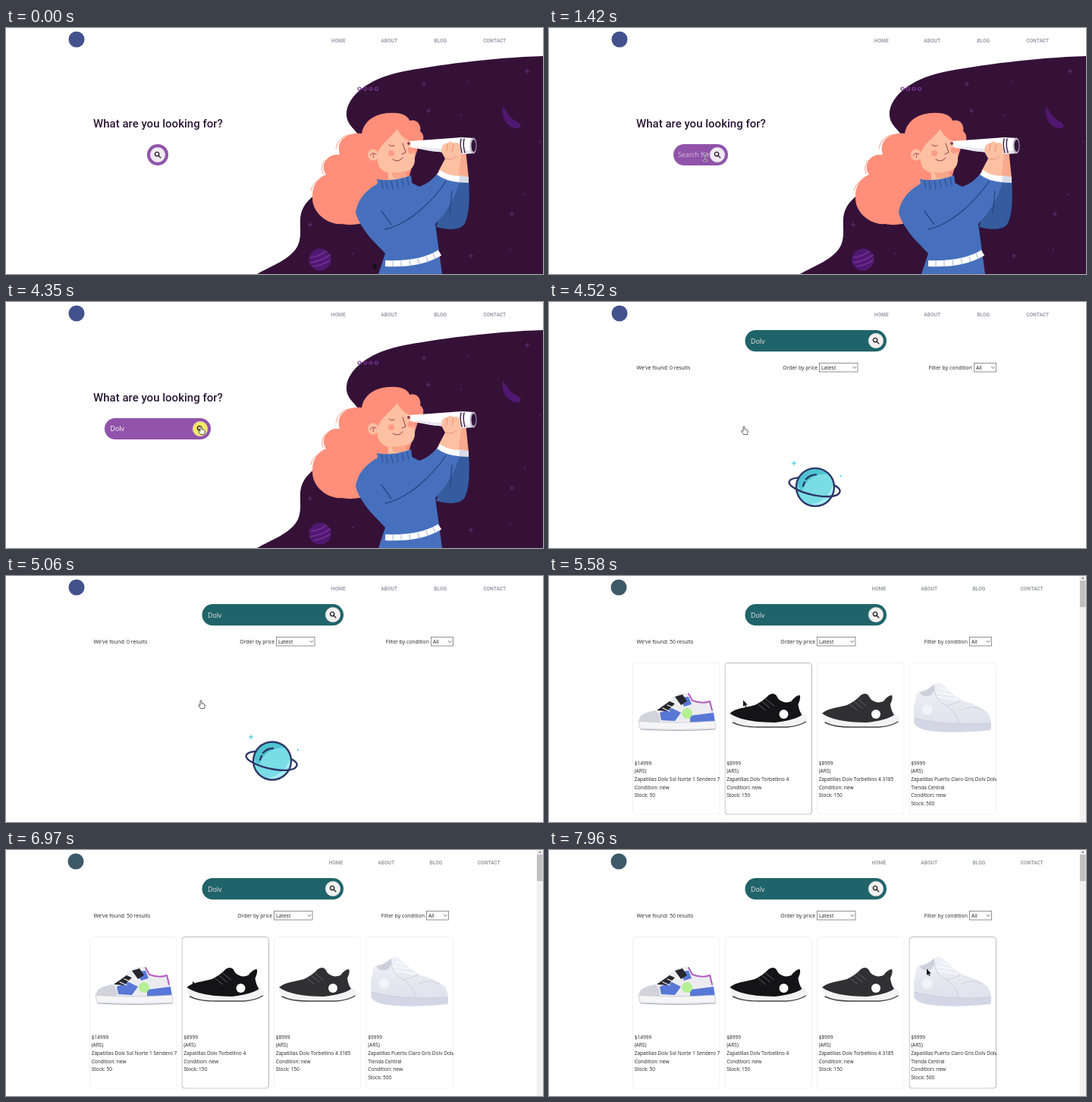
These frames come from a looping animation (708 px wide and 324 px high, 8 s). An HTML page:

```html
<!DOCTYPE html>
<html lang="en">
<head>
<meta charset="utf-8">
<style>
  html, body { margin: 0; width: 100%; height: 100%; overflow: hidden; background: #fff; }
  svg { display: block; font-family: "Open Sans", "Noto Sans", sans-serif; }
  .roboto { font-family: Roboto, sans-serif; }
  .line { fill: none; stroke-linecap: round; stroke-linejoin: round; }
</style>
</head>
<body>
<svg id="stage" width="708" height="324" viewBox="0 0 708 324">
  <defs>
    <g id="lens">
      <circle r="9.8" stroke="#d8d4da" stroke-width=".6"/>
      <g class="line" stroke="#2b2033" stroke-width="1.4"><circle cx="-.9" cy="-.9" r="2.7"/><path d="M1.2 1.2L3.8 3.8"/></g>
    </g>
    <path id="plus" class="line" d="M-2.8 0H2.8M0-2.8V2.8" stroke="#633079"/>
    <linearGradient id="leather" x2="0" y2="1"><stop stop-color="#f0f1f6"/><stop offset="1" stop-color="#dcdfea"/></linearGradient>
    <g id="runner">
      <path fill="#f3f3f4" d="M7 67Q30 78 60 78Q90 76 102 67Q110 70 109 76Q100 84 70 84Q30 86 14 80Q6 76 7 67Z"/>
      <path class="line" stroke="#444" stroke-width="1.5" d="M11 79Q22 85 45 85H82Q98 84 107 78"/>
      <path d="M7 67C14 60 30 59 40 56Q52 50 58 43Q64 39 68 43L71 48Q79 55 88 51Q94 43 99 43Q101 46 97 55Q98 63 102 69Q92 76 66 79Q24 79 7 67Z"/>
      <path class="line" d="M44 55L54 63M49 51L60 60M54 48L65 57" stroke="#707074" stroke-width=".8"/>
      <circle cx="78" cy="68" r="6" fill="#fff"/>
    </g>
  </defs>

  <g id="home">
    <path fill="#351138" d="M708 37C640 39 566 49 520 58C472 68 447 94 449 116C451 134 474 138 470 165C462 200 422 205 402 224C378 246 394 264 385 286C376 305 348 314 331 324H708Z"/>
    <g id="stars"></g>
    <path fill="#501871" d="M655 103C652 121 664 134 677 132Q681 126 673 123C664 119 661 111 655 103Z"/>
    <circle cx="414" cy="305" r="14.5" fill="#501871"/>
    <path class="line" stroke="#71318f" stroke-width="1.6" d="M402 302Q413 301 422 294M401 309Q416 307 427 299M406 314Q418 312 427 306"/>

    <path fill="#345c9f" d="M588 194L610 200Q613 244 604 259Q594 269 567 262Z"/>
    <path fill="#f8aa8e" d="M594 160H606L610 198H588Z"/>
    <path fill="#d9dbe7" d="M590 193L610 196V204L590 203Z"/>
    <path fill="#ff8f7a" d="M469 139C472 121 489 112 506 112C522 111 530 116 532 122C542 119 548 128 546 136C553 141 551 151 544 155L530 200L500 235C488 256 460 262 443 258C425 260 404 244 404 224C403 207 412 197 422 193C413 181 424 164 440 167C434 148 450 137 469 139Z"/>
    <path class="line" stroke="#ff9e89" d="M435 159Q437 143 455 140M418 192Q414 182 421 174M402 214Q405 202 417 198"/>
    <path fill="#4670bd" d="M490 205Q465 219 461 242Q463 255 480 276L500 297L491 324H575L566 258Q588 236 598 204L570 190Q560 204 545 209L535 204Z"/>
    <path fill="#fdc0a2" d="M490 176C486 156 506 147 516 133Q523 148 538 150L539 175Q537 190 519 190L523 201Q510 206 504 200V191Q491 187 490 176Z"/>
    <path fill="#f8a58a" d="M508 190Q516 192 526 188L530 198H511Z"/>
    <path fill="#4670bd" d="M489 199Q510 203 534 194L536 210Q512 216 491 211Z"/>
    <path class="line" stroke="#2b4885" d="M495 201L497 211M501 202L503 212M508 202L510 212M515 201L517 211M522 199L524 209M529 197L531 207"/>
    <ellipse cx="484" cy="167" rx="7" ry="7.5" fill="#fdc0a2"/>
    <path class="line" stroke="#a8485a" d="M480 168Q482 163 488 166M485 166L484 171"/>
    <g fill="#ff9a86"><circle cx="508" cy="165" r="4"/><circle cx="534" cy="161" r="4.5"/></g>
    <path class="line" stroke="#963b4d" d="M505 154Q508 157 512 155M523 152L527 164L522 166M510 173Q517 178 523 171"/>
    <path fill="#fff" d="M532 149L560 147L601 144L616 145V165L600 166L560 162L533 157Z"/>
    <path fill="#e7e7ef" d="M533 155L560 158L600 162L616 161V165L600 166L560 162Z"/>
    <path class="line" stroke="#452252" stroke-width="1.5" d="M600 146Q598 154 601 164M604 146Q602 154 605 164"/>
    <ellipse cx="616" cy="155" rx="4.5" ry="10.5" fill="#b8b4c4"/><ellipse cx="616.6" cy="155" rx="3" ry="8" fill="#31143a"/>
    <circle cx="531" cy="152" r="2" fill="#8b3d50"/>
    <path fill="#fdc0a2" d="M574 163Q574 151 582 152Q586 147 590 152Q596 149 598 155L600 168L596 198L570 189L579 172Z"/>
    <path class="line" stroke="#ec9279" d="M582 152L581 162M590 152L588 163M579 172Q588 175 594 169"/>
    <path fill="#fff" d="M572 187Q583 195 598 195L597 203Q580 202 568 193Z"/>
    <path class="line" stroke="#284581" stroke-width="1.3" d="M500 265C530 259 562 229 580 202M495 241L508 259M588 215L585 244"/>
    <path class="line" stroke="#fff" stroke-width="8" style="stroke-linecap:butt" d="M500 310Q546 312 572 296"/>
    <path class="line" stroke="#9fb1d8" d="M510 307V314M521 307V314M532 306L533 313M543 304L545 311M554 301L556 308M563 297L566 304"/>

    <text class="roboto" x="115" y="131" font-size="15" font-weight="500" fill="#2b1836">What are you looking for?</text>
    <rect id="bar" y="153" height="28" rx="14" fill="#9153aa"/>
    <svg id="field" y="153" height="28">
      <text id="hint" y="17.2" font-size="8.8" fill="#d6bce0">Search for...</text>
      <text id="typed" y="17.2" font-size="8.8" fill="#fff"></text>
      <rect id="caret" y="8.5" width=".8" height="11" fill="#fff"/>
    </svg>
    <use id="button" href="#lens"/>
  </g>

  <g id="results">
    <rect x="258.5" y="37" width="186.5" height="28.3" rx="14.1" fill="#1f646a"/>
    <text x="266" y="55" font-size="8.8" fill="#f0e4df">Dolv</text>
    <use href="#lens" x="431" y="51" fill="#f1f1ee"/>
    <text id="count" x="115.5" y="88.5" font-size="6.9" fill="#222"></text>
    <g id="order"></g>
    <g id="filter"></g>
  </g>

  <g id="loader">
    <circle cx="351" cy="243.5" r="25" fill="#7adde6"/>
    <path fill="#4fc4d2" d="M327 240A25 25 0 0 1 369 226Q342 225 333 250Z"/>
    <path fill="#a6edf2" d="M375 237A25 25 0 0 1 343 267Q370 262 375 237Z"/>
    <g class="line" stroke="#2d3767" stroke-width="2.4">
      <circle cx="351" cy="243.5" r="25"/>
      <path d="M329 231C314 232 313 239 324 245C341 255 371 259 381 253Q388 247 376 241M335 242Q336 239 337 237M339 233Q344 227 352 227"/>
    </g>
    <g id="sparkles" fill="#62d3dd"><path d="M323 208L324 211L327 212L324 213L323 216L322 213L319 212L322 211Z"/><circle cx="385" cy="229" r="1.2"/></g>
  </g>

  <g id="cards"></g>
  <g id="scroll"><rect x="699.5" width="8.5" height="324" fill="#f1f1f1"/><rect x="700" y="6" width="7.5" height="35" fill="#c1c1c1"/><path d="M702 3.5L703.8 1.5L705.6 3.5Z" fill="#555"/></g>

  <circle id="logo" cy="15" r="10.5"/>
  <g id="nav" class="roboto" font-size="6.65" font-weight="700"></g>

  <g id="pointer">
    <path id="arrow" d="M0 0V8.4L1.9 6.7L3.2 9.6L4.5 9L3.2 6.2H5.8Z" fill="#111"/>
    <g id="beam" class="line"><path d="M-2-4.5H2M0-4.5V4.5M-2 4.5H2" stroke="#e6d8ec" stroke-width="2"/><path d="M-1.8-4.5H1.8M0-4.5V4.5M-1.8 4.5H1.8" stroke="#4a3553" stroke-width=".9"/></g>
    <path id="hand" d="M0 1Q1-.6 2 1V4.2L5 5Q6.6 5.4 6.3 7.5L5.4 11H.6L-2.4 6.8Q-2 5.4 0 6.8Z" fill="#fff" stroke="#333" stroke-width=".8"/>
  </g>
</svg>

<script>
const LOOP = 8000, SUBMIT = 4520, LOADED = 5360;
const $ = id => document.getElementById(id);
const set = (node, attrs) => { for (const k in attrs) node.setAttribute(k, attrs[k]); };
const show = (id, on) => { $(id).style.display = on ? "" : "none"; };

$("stars").innerHTML =
  [[551, 74], [687, 57], [557, 109], [667, 245], [401, 259], [613, 300]]
    .map(([x, y]) => `<use href="#plus" x="${x}" y="${y}"/>`).join("") +
  [[600, 115], [704, 150], [684, 219], [665, 292], [457, 297], [610, 71]]
    .map(([x, y]) => `<circle cx="${x}" cy="${y}" r="1" fill="#5d2875"/>`).join("") +
  [466, 473.5, 481, 488.5]
    .map(x => `<circle cx="${x}" cy="80" r="2" fill="none" stroke="#7b3698" stroke-width="1.2"/>`).join("");

$("nav").innerHTML = ["HOME", "ABOUT", "BLOG", "CONTACT"].map(s => `<text y="19">${s}</text>`).join("");
const navX = { wide: [428.8, 494.3, 564.3, 629.2], narrow: [425.5, 490.3, 558.5, 621.7] };

const dropdown = (label, labelX, value, x, w) => `<g font-size="6.85" fill="#222">
  <text x="${labelX}" y="88.7">${label}</text>
  <rect x="${x}" y="80.5" width="${w}" height="11.5" fill="#fff" stroke="#777" stroke-width=".8"/>
  <text x="${x + 2.5}" y="88.7">${value}</text>
  <path class="line" stroke="#444" stroke-width=".8" d="M${x + w - 6} 85.5l1.9 1.9l1.9-1.9"/></g>`;
$("order").innerHTML = dropdown("Order by price", 308.3, "Latest", 356.5, 50.5);
$("filter").innerHTML = dropdown("Filter by condition", 500.8, "All", 560.5, 29);

// Shoe pictures use coordinates relative to their card
const shoes = [
  `<path fill="#ececf0" d="M8 78Q9 68 22 65L38 62L50 48Q61 38 73 40L78 49Q92 55 103 50L106 60L109 80H8Z"/>
   <path fill="#d3d4db" d="M8 78Q9 68 22 65L30 63Q38 69 36 78Z"/>
   <path fill="#5877d6" d="M36 66L52 60L64 66L56 77L38 76ZM76 70L107 66L109 79H76ZM62 46L74 45L78 55L68 58Z"/>
   <path fill="#26262e" d="M32 63L49 51L56 54L46 64ZM56 45L66 42L72 51L64 56Z"/>
   <path class="line" stroke="#fff" stroke-width="1.2" d="M40 60L49 64M46 56L56 60M51 51L62 56"/>
   <path class="line" stroke="#b45fc0" stroke-width="2" d="M74 41L79 50Q92 55 102 51L105 63"/>
   <circle cx="72" cy="67" r="7" fill="#b5f095"/>
   <path fill="#f5f5f8" stroke="#c3c4cc" stroke-width=".7" d="M8 77Q50 81 109 77L110 87Q60 90 10 87Z"/>
   <path class="line" stroke="#a9abb5" stroke-width="1" d="M11 88Q60 91 109 88"/>`,
  `<use href="#runner" fill="#141416"/>`,
  `<use href="#runner" fill="#302f32"/>`,
  `<path fill="url(#leather)" d="M7 70Q5 58 9 50Q8 41 14 38Q25 36 32 29Q39 24 45 29L57 41L70 50Q93 56 104 66Q110 76 108 88Q60 92 30 90Q12 88 7 80Z"/>
   <path fill="#cdd0dc" d="M14 39Q25 37 33 29Q36 36 29 43Q18 47 14 39Z"/>
   <path fill="#d3d7e5" d="M7 73Q45 84 108 80V89Q60 94 30 90Q12 88 7 80Z"/>
   <path class="line" stroke="#f8f8fb" stroke-width="2" d="M40 33L51 38M37 39L57 43M38 45L64 49"/>
   <path class="line" stroke="#c5c8d5" stroke-width=".8" d="M33 34Q34 50 50 57L68 51M50 57Q62 66 66 80M70 62Q84 55 98 63M7 73Q45 84 108 80"/>
   <circle cx="24" cy="62" r="7" fill="#f2f3f8"/>`
];
const items = [
  ["$14999", "(ARS)", "Zapatillas Dolv Sol Norte 1 Sendero 75", "Condition: new", "Stock: 50"],
  ["$8999", "(ARS)", "Zapatillas Dolv Torbellino 4", "Condition: new", "Stock: 150"],
  ["$8999", "(ARS)", "Zapatillas Dolv Torbellino 4 3185", "Condition: new", "Stock: 150"],
  ["$9999", "(ARS)", "Zapatillas Puerto Claro Gris Dolv Dolv", "Tienda Central", "Condition: new", "Stock: 500"]
];
const cardX = i => 110 + i * 121.5;
$("cards").innerHTML = items.map((lines, i) => `<svg x="${cardX(i)}" y="114" width="115.5" height="200.5">
  <rect class="card" x=".5" y=".5" width="114.5" height="199.5" rx="4" fill="#fff" stroke-width=".9"/>
  ${shoes[i]}
  ${lines.map((s, j) => `<text x="2.7" y="${134.7 + j * 10.6}" font-size="6.55" fill="#222">${s}</text>`).join("")}</svg>`).join("");
const cards = document.querySelectorAll(".card");

// Pointer stops: time, x, y
const path = [
  [0, 484, 309], [70, 484, 309], [830, 307, 248], [1320, 207, 173], [1420, 206, 170], [1650, 217, 168], [1950, 224, 167],
  [3890, 224, 167], [4270, 256, 163.5], [6270, 256, 163.5], [6650, 172, 176], [7040, 262, 172],
  [7120, 278, 170], [7890, 488, 157.5], [7960, 498, 156.5], [LOOP, 498, 156.5]
];
function pointerAt(t) {
  const i = path.findIndex(p => p[0] > t), [t0, x0, y0] = path[i - 1], [t1, x1, y1] = path[i];
  const k = (t - t0) / (t1 - t0);
  return [x0 + (x1 - x0) * k, y0 + (y1 - y0) * k];
}

// cubic-bezier(.25, .1, .25, 1)
function ease(p) {
  if (p <= 0 || p >= 1) return p <= 0 ? 0 : 1;
  const curve = (s, a, b) => 3 * (1 - s) ** 2 * s * a + 3 * (1 - s) * s * s * b + s ** 3;
  let lo = 0, hi = 1;
  for (let i = 0; i < 20; i++) {
    const mid = (lo + hi) / 2;
    if (curve(mid, .25, .25) < p) lo = mid; else hi = mid;
  }
  return curve(lo, .1, 1);
}

function drawSearch(t, overButton) {
  const open = ease((t - 1324) / 400), width = 28 + 112 * open, left = 200 - width / 2;
  const inset = 5 + 2.5 * open;
  set($("bar"), { x: left, width });
  set($("field"), { x: left + inset, width: Math.max(0, width - 24 - inset) });
  set($("button"), { x: left + width - 14, y: 167, fill: overButton ? "#f6e866" : "#f0ebf3" });
  const length = t < 2810 ? 0 : Math.min(4, 1 + Math.floor((t - 2810) / 150));
  $("typed").textContent = "Dolv".slice(0, length);
  show("hint", !length && open > 0);
  show("caret", (t >= 1800 && t < 2330) || (t >= 2810 && t < 3430) || (t >= 3890 && t < 4270));
  set($("caret"), { x: length ? $("typed").getComputedTextLength() + .2 : .2 });
}

function draw(t) {
  const home = t < SUBMIT, loaded = t >= LOADED;
  const [x, y] = pointerAt(t);
  const overButton = home && x > 245 && t > 3890;
  show("home", home);
  show("results", !home);
  show("loader", !home && !loaded);
  show("cards", loaded);
  show("scroll", loaded);

  set($("logo"), { cx: loaded ? 92 : 93, fill: loaded ? "#3d5968" : "#43528c" });
  [...$("nav").children].forEach((n, i) => set(n, { x: navX[loaded ? "narrow" : "wide"][i] }));
  set($("nav"), { fill: loaded ? "#9b9fa3" : "#a09bad" });

  if (home) drawSearch(t, overButton);
  else {
    $("count").textContent = `We've found: ${loaded ? 50 : 0} results`;
    set($("order"), { transform: `translate(${loaded ? -3 : 0})` });
    set($("filter"), { transform: `translate(${loaded ? -6 : 0})` });
    const phase = (t - 5060) / 1000 * Math.PI * 2;
    set($("loader"), { transform: `translate(0 ${1.5 * Math.sin(phase)})` });
    set($("sparkles"), { opacity: .75 + .25 * Math.cos(phase * 2) });
    cards.forEach((c, i) => {
      const hover = x >= cardX(i) && x <= cardX(i) + 115;
      set(c, { stroke: hover ? "#b0b0b0" : "#f0f0f0" });
    });
  }

  const hand = overButton || (!home && !loaded), beam = home && !hand && t >= 1324;
  show("pointer", t < 2880 || t >= 3890);
  set($("pointer"), { transform: `translate(${x} ${y})` });
  show("hand", hand);
  show("beam", beam);
  show("arrow", !hand && !beam);
}

function tick() {
  draw(performance.now() % LOOP);
  requestAnimationFrame(tick);
}
tick();
</script>
</body>
</html>
```
